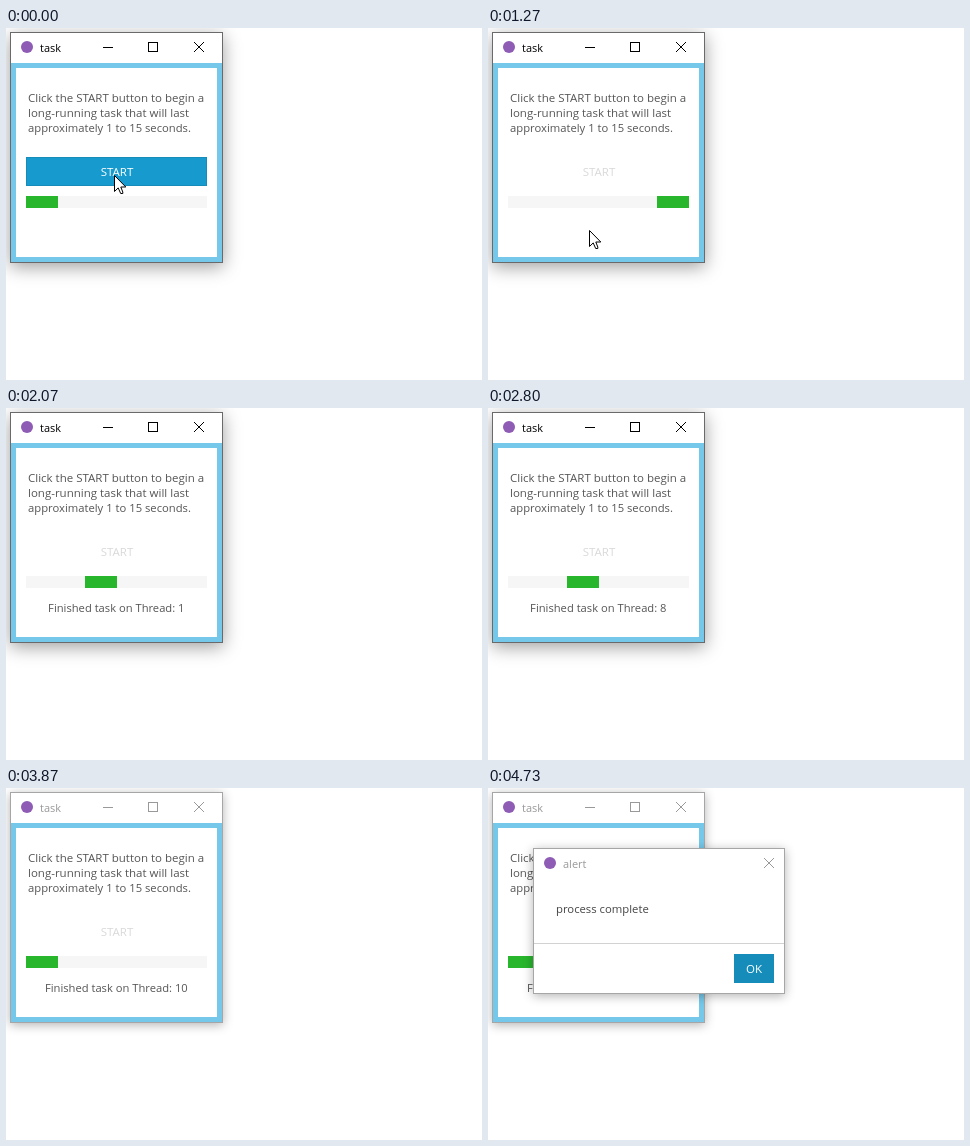
An HTML page with a canvas for the animation above (4.94 s loop, 476 by 352 pixels).

```html
<!DOCTYPE html>
<html lang="en">
<head>
<meta charset="utf-8">
<title>task</title>
<style>
  html, body { margin: 0; width: 100%; height: 100%; overflow: hidden; background: #fff; }
  canvas { display: block; }
</style>
</head>
<body>
<canvas id="stage" width="476" height="352"></canvas>
<script>
const ctx = document.getElementById('stage').getContext('2d');
const LOOP = 4940;
const TICK = 200 / 3;
const PRESS = 670, RELEASE = 800, DONE = 3870, BLUR = 4730;

// Pointer waypoints: time, x, y
const POINTER = [[930, 108, 142], [1130, 107, 174], [1270, 101, 202], [1670, 62, 315], [1800, 34, 352]];

function rect(x, y, w, h, color) {
  ctx.fillStyle = color;
  ctx.fillRect(x, y, w, h);
}

function frame(x, y, w, h, color) {
  ctx.strokeStyle = color;
  ctx.lineWidth = 1;
  ctx.strokeRect(x + 0.5, y + 0.5, w - 1, h - 1);
}

function label(text, x, y, color = '#555', size = 11.5, align = 'left') {
  ctx.font = `${size}px "Open Sans", "Noto Sans", sans-serif`;
  ctx.textAlign = align;
  ctx.fillStyle = color;
  ctx.fillText(text, x, y);
}

function closeMark(x, y, color) {
  ctx.strokeStyle = color;
  ctx.lineWidth = 1;
  ctx.beginPath();
  ctx.moveTo(x, y);
  ctx.lineTo(x + 10, y + 10);
  ctx.moveTo(x + 10, y);
  ctx.lineTo(x, y + 10);
  ctx.stroke();
}

// White window with shadow, border, icon, title and close mark
function windowBase(x, y, w, h, title, active) {
  const ink = active ? '#000' : '#999';
  ctx.save();
  ctx.shadowColor = active ? 'rgba(0,0,0,.38)' : 'rgba(0,0,0,.3)';
  ctx.shadowBlur = active ? 17 : 10;
  ctx.shadowOffsetY = active ? 4 : 2;
  rect(x, y, w, h, '#fff');
  ctx.restore();
  frame(x, y, w, h, active ? '#6a6a6a' : '#a6a6a6');
  ctx.fillStyle = '#8e5bb5';
  ctx.beginPath();
  ctx.arc(x + 17, y + 15, 6, 0, 7);
  ctx.fill();
  label(title, x + 30, y + 20, ink, 11);
  closeMark(x + w - 29 + (title === 'alert' ? 8 : 0), y + (title === 'alert' ? 10 : 10), ink);
  return ink;
}

function startButton(t) {
  if (t >= RELEASE) {
    label('START', 111, 148, '#d9d9d9', 11.5, 'center');
    return;
  }
  const pressed = t >= PRESS;
  rect(20, 129, 181, 29, pressed ? '#137ea7' : '#179acd');
  frame(20, 129, 181, 29, pressed ? '#137ea7' : '#158cba');
  if (pressed) {
    ctx.setLineDash([3, 2]);
    frame(22, 131, 177, 25, '#fff');
    ctx.setLineDash([]);
  }
  label('START', 111, 148, '#fff', 11.5, 'center');
}

// The bar bounces in tenths of its travel
function progress(t) {
  const step = t >= RELEASE && t < DONE ? Math.floor((t - 638) / 58.5) % 20 : 0;
  const offset = Math.floor(14.9 * (step > 10 ? 20 - step : step));
  rect(20, 168, 181, 12, '#f6f6f6');
  rect(20 + offset, 168, 32, 12, '#28b62c');
}

function status(t) {
  if (t < 1870) return;
  const thread = t < 2800 ? 1 : t < 3530 ? 8 : 10;
  label('Finished task on Thread: ' + thread, 110.3, 204, '#555', 11.2, 'center');
}

function taskWindow(t) {
  const ink = windowBase(4, 4, 213, 231, 'task', t < DONE);
  rect(97, 19, 10, 1, ink);
  frame(142, 14, 10, 10, ink);
  rect(5, 35, 211, 199, '#75c8e9');
  rect(10, 40, 201, 189, '#fff');
  label('Click the START button to begin a', 22, 74);
  label('long-running task that will last', 22, 89);
  label('approximately 1 to 15 seconds.', 22, 104, '#555', 11.25);
  startButton(t);
  progress(t);
  status(t);
}

function alertWindow(t) {
  if (t <= DONE) return;
  const p = Math.min(1, (t - DONE) / 260);
  const ease = 1 - (1 - p) ** 3;
  const scale = 0.9 + 0.1 * ease;
  ctx.save();
  ctx.globalAlpha = ease;
  ctx.translate(171, 133);
  ctx.scale(scale, scale);
  ctx.translate(-171, -133);
  windowBase(45, 60, 252, 146, 'alert', t < BLUR);
  label('process complete', 68, 125, '#444', 11.3);
  rect(46, 155, 250, 1, '#d2d2d2');
  rect(246, 166, 40, 29, '#158cba');
  label('OK', 266, 185, '#fff', 11.5, 'center');
  ctx.restore();
}

function pointerAt(t) {
  if (t < 70) return [108, 147];
  if (t <= POINTER[0][0]) return POINTER[0].slice(1);
  const i = POINTER.findIndex(p => p[0] >= t);
  if (i < 0) return null;
  const [t0, x0, y0] = POINTER[i - 1], [t1, x1, y1] = POINTER[i];
  const k = (t - t0) / (t1 - t0);
  return [Math.round(x0 + (x1 - x0) * k), Math.round(y0 + (y1 - y0) * k)];
}

function pointer(t) {
  const at = pointerAt(t);
  if (!at) return;
  ctx.save();
  ctx.translate(at[0] + 0.5, at[1] + 0.5);
  ctx.fillStyle = '#fff';
  ctx.strokeStyle = '#000';
  ctx.lineWidth = 1;
  const arrow = new Path2D('M0 0V16L3.7 12.4L6.2 18H8.3V16.5L6.3 11.5H11.3Z');
  ctx.fill(arrow);
  ctx.stroke(arrow);
  ctx.restore();
}

function draw(now) {
  // The picture advances fifteen times a second, on whole hundredths
  const clock = Math.floor((now % LOOP) / 10) * 10;
  const tick = Math.floor((clock + 4) / TICK);
  const t = Math.round(tick * TICK / 10) * 10;
  rect(0, 0, 476, 352, '#fff');
  taskWindow(t);
  alertWindow(t);
  pointer(t);
}

let start;
function loop(now) {
  start ??= now;
  draw(now - start);
  requestAnimationFrame(loop);
}
draw(0);
requestAnimationFrame(loop);
</script>
</body>
</html>
```
